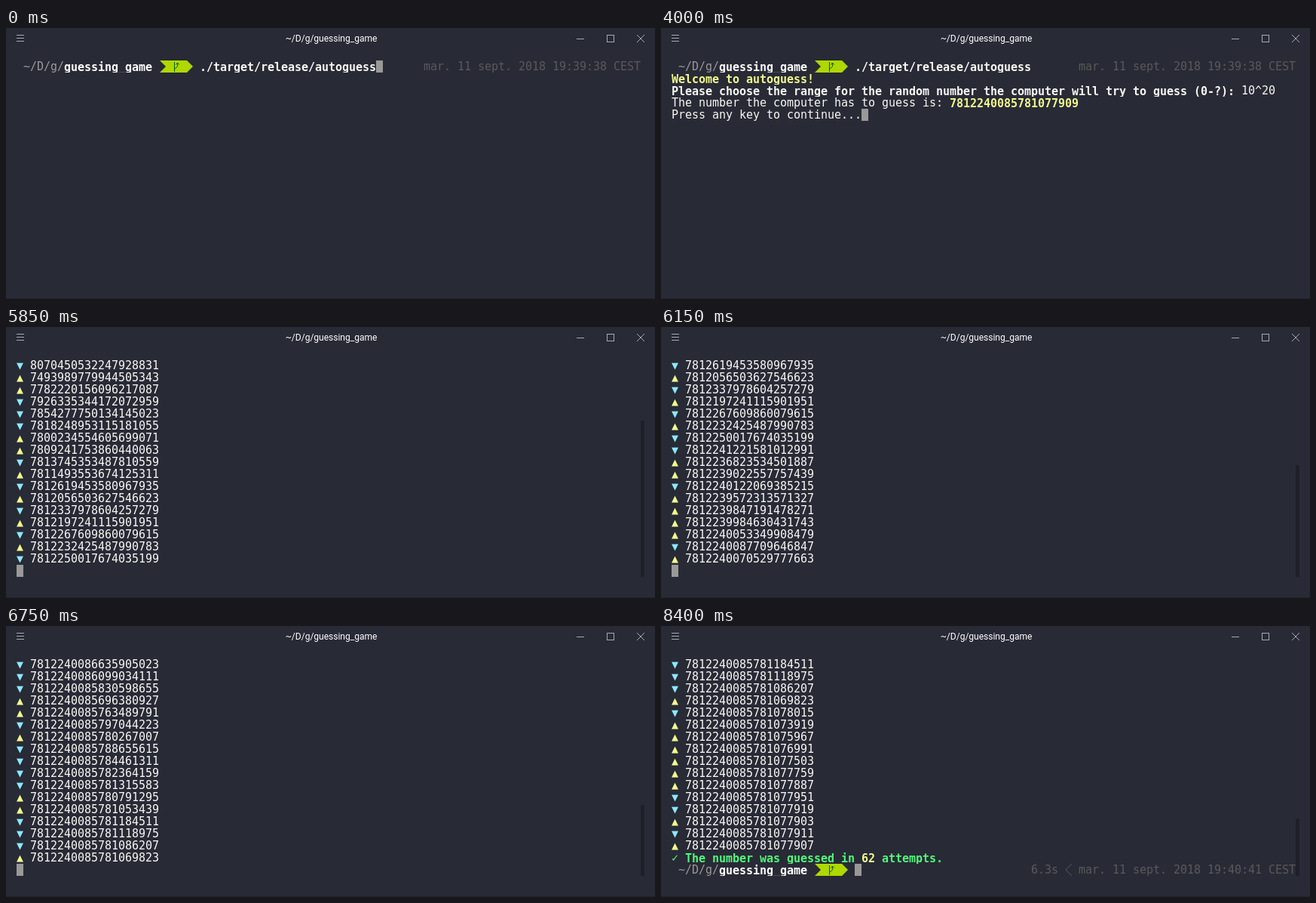
An HTML page with a canvas for the animation above (8.45 s loop, 861 by 359 pixels).

```html
<!DOCTYPE html>
<html lang="fr">
<head>
<meta charset="utf-8">
<title>Terminal</title>
<style>
html, body { margin: 0; width: 100%; height: 100%; overflow: hidden; background: #282a36; }
canvas { display: block; }
</style>
</head>
<body>
<canvas id="stage" width="861" height="359"></canvas>
<script>
const g = document.getElementById('stage').getContext('2d');
const LOOP = 8450, CELL_W = 9, CELL_H = 16, LEFT = 14, TOP = 43, ROWS = 18;
const BG = '#282a36', TEXT = '#f8f8f2', WHITE = '#ffffff', GREY = '#999999', DIM = '#5a5a5a',
      YELLOW = '#f1fa8c', CYAN = '#8be9fd', GREEN = '#50fa7b', LIME = '#afd700', LEAF = '#005f00';
const MONO = '15px "DejaVu Sans Mono", monospace';
const BLINKS = [50, 1400, 4600, 7800]; // cursor hidden for 600 ms from each
const KEYS = [[2300, '1'], [2500, '0'], [3100, '^'], [3300, '2'], [3450, '0']];

// Binary search for the secret number
const SECRET = 7812240085781077909n;
const guesses = [];
for (let lo = 0n, hi = 2n ** 63n - 1n; ;) {
  const mid = (lo + hi) / 2n;
  if (mid === SECRET) break;
  const low = mid < SECRET;
  guesses.push([run(0, low ? '▲' : '▼', low ? YELLOW : CYAN), run(2, String(mid))]);
  if (low) lo = mid; else hi = mid;
}

function run(col, text, color = TEXT, bold = false) {
  return { col, text, color, bold };
}

function prompt(command, date, elapsed) {
  const row = [run(1, '~/D/g/', GREY), run(7, 'guessing_game', WHITE, true),
               run(27, command, TEXT, true), run(60, date, DIM)];
  if (elapsed) row.push(run(53, elapsed, DIM));
  row.badge = true;
  row.chevron = !!elapsed;
  return row;
}

function buildScreen(t) {
  const rows = [prompt('./target/release/autoguess', 'mar. 11 sept. 2018 19:39:38 CEST')];
  if (t < 750) return { rows, col: 53 };
  if (t < 1000) return { rows: [...rows, []], col: 0 };

  const question = 'Please choose the range for the random number the computer will try to guess (0-?): ';
  const typed = KEYS.filter(k => t >= k[0]).map(k => k[1]).join('');
  rows.push([run(0, 'Welcome to autoguess!', YELLOW, true)],
            [run(0, question, TEXT, true), run(84, typed)]);
  if (t < 4000) return { rows, col: 84 + typed.length };

  rows.push([run(0, 'The number the computer has to guess is:'), run(41, String(SECRET), YELLOW, true)],
            [run(0, 'Press any key to continue...')]);
  if (t < 5300) return { rows, col: 28 };

  // One guess every 30 ms; the screen skips a refresh every 200 ms
  const shown = t % 200 ? t : t - 50;
  const count = Math.max(1, Math.floor((shown - 5290) / 30) + 1);
  rows.push(...guesses.slice(0, count));
  if (count > guesses.length) {
    rows.push([run(0, '✓', GREEN), run(2, 'The number was guessed in', GREEN, true),
               run(28, '62', YELLOW, true), run(31, 'attempts.', GREEN, true)]);
  }
  if (t < 7250) return { rows: [...rows, []], col: 0 };
  rows.push(prompt('', 'mar. 11 sept. 2018 19:40:41 CEST', '6.3s'));
  return { rows, col: 27 };
}

function path(points, close) {
  g.beginPath();
  points.forEach(([x, y]) => g.lineTo(x, y));
  if (close) g.closePath();
}

function line(color, ...points) {
  g.strokeStyle = color;
  g.lineWidth = 1;
  path(points);
  g.stroke();
}

function drawRun({ col, text, color, bold }, y) {
  const x = LEFT + col * CELL_W;
  g.save();
  g.beginPath();
  g.rect(x, y, text.length * CELL_W, CELL_H);
  g.clip();
  g.font = (bold ? 'bold ' : '') + MONO;
  g.fillStyle = color;
  [...text].forEach((c, i) => g.fillText(c, x + i * CELL_W, y + (bold ? 14 : 13)));
  g.restore();
}

function drawBadge(y) {
  g.fillStyle = LIME;
  path([[204, y], [240, y], [248, y + 8], [240, y + 16], [204, y + 16], [212, y + 8]], true);
  g.fill();
  // git branch sign
  line(LEAF, [223.5, y + 2], [223.5, y + 15]);
  line(LEAF, [223.5, y + 11.5], [227.5, y + 8], [227.5, y + 4]);
  line(LEAF, [225.5, y + 5.5], [227.5, y + 3], [229.5, y + 5.5]);
}

function drawWindow() {
  g.fillStyle = BG;
  g.fillRect(0, 0, 861, 359);
  g.fillStyle = '#20222b';
  g.fillRect(0, 358, 861, 1);
  g.fillStyle = WHITE;
  g.font = '12px Roboto, sans-serif';
  g.textAlign = 'center';
  g.fillText('~/D/g/guessing_game', 431.5, 18);
  g.textAlign = 'left';
  const ink = '#a9aaaf';
  for (const y of [9.5, 13.5, 17.5]) line(ink, [14, y], [24, y]);
  line(ink, [757, 14.5], [767, 14.5]);
  g.strokeRect(797.5, 9.5, 9, 9);
  line(ink, [837, 9], [847, 19]);
  line(ink, [847, 9], [837, 19]);
}

function draw(time) {
  const t = Math.floor(time % LOOP / 50) * 50;
  const { rows, col } = buildScreen(t);
  const first = Math.max(0, rows.length - ROWS);
  const rowY = i => TOP + (i - first) * CELL_H;

  drawWindow();
  rows.forEach((row, i) => {
    if (i < first) return;
    const y = rowY(i);
    row.forEach(r => drawRun(r, y));
    if (row.badge) drawBadge(y);
    if (row.chevron) line(DIM, [545, y], [537, y + 8], [545, y + 16]);
  });
  if (first) {
    const full = ROWS * CELL_H, thumb = Math.round(full * ROWS / rows.length);
    g.fillStyle = 'rgba(24, 25, 32, 0.6)';
    g.fillRect(842, TOP + full - thumb, 5, thumb);
  }
  if (!BLINKS.some(b => t >= b && t < b + 600)) {
    g.fillStyle = GREY;
    g.fillRect(LEFT + col * CELL_W, rowY(rows.length - 1), CELL_W, CELL_H);
  }
}

const start = performance.now();
function tick() {
  draw(performance.now() - start);
  requestAnimationFrame(tick);
}
tick();
</script>
</body>
</html>
```
